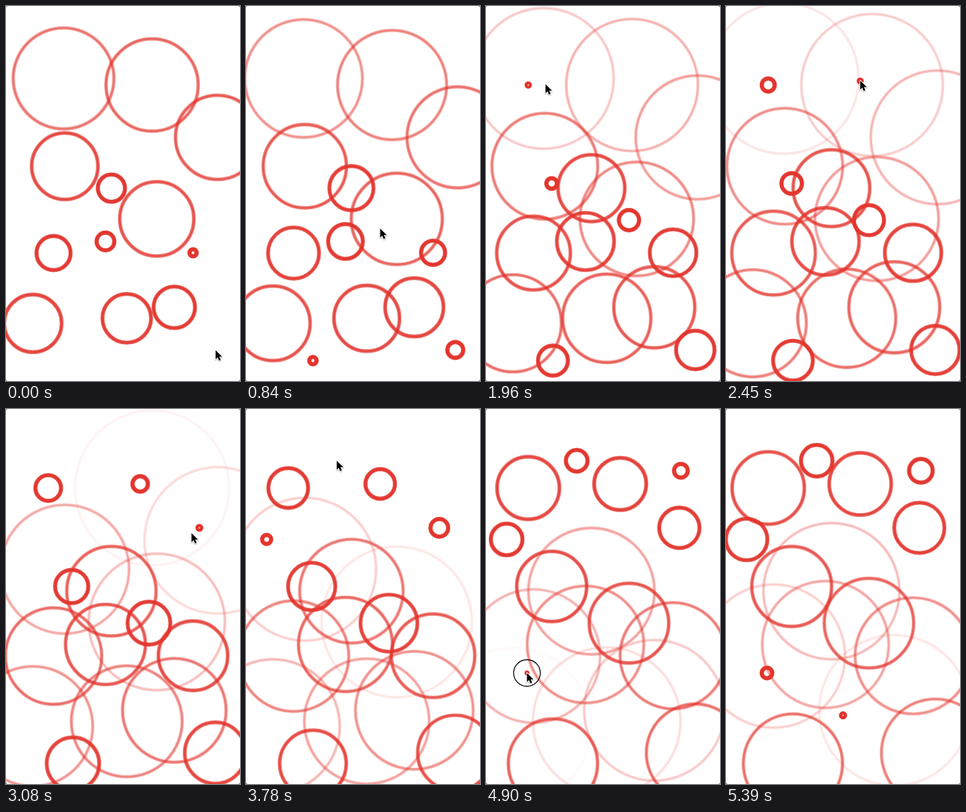
Animation of 374 by 598 pixels, one loop 5460 ms. Source, as an HTML page with a canvas:

```html
<!DOCTYPE html>
<html lang="en">
<head>
<meta charset="utf-8">
<title>Ripples</title>
<style>
  html, body { margin: 0; width: 100%; height: 100%; overflow: hidden; background: #fff; }
  canvas { display: block; width: 374px; height: 598px; }
</style>
</head>
<body>
<canvas id="stage" width="374" height="598"></canvas>
<script>
const W = 374, H = 598, LOOP = 5460, STEP = 70;
const SPEED = 0.016, START = 3, END = 128.5;
const ctx = document.getElementById('stage').getContext('2d');

// x, y, outer radius at time zero (negative: not tapped yet)
const rings = [
  [92, 115.5, 83.3], [233.5, 126, 76.5], [338, 209.5, 70], [241, 339.5, 62.2],
  [94, 255.5, 56], [43, 506, 49], [193, 498, 42], [269, 480.5, 36.3],
  [76, 394, 30.5], [168.5, 290.5, 25], [159, 375.5, 17.5], [299, 393.5, 9.1],
  [334.5, 548.5, 2.6], [107, 565.5, -4.2], [228.5, 341.5, -11.9], [105, 283, -19.5],
  [67.5, 126, -25.5], [214.5, 119.5, -33.6], [309, 189.5, -43], [33, 208, -49.9],
  [145, 82.5, -57.8], [311.5, 98.5, -64.1], [65.5, 421, -74.5], [187, 488.5, -79.7]
];

// The pointer rests at each tap, then heads for the next one
const path = [[0, 335, 549]];
for (const [x, y, r] of rings.filter(ring => ring[2] < START)) {
  const tap = (START - r) / SPEED;
  path.push([tap - 70, x, y], [tap + 80, x, y]);
}
path.push([840, 214.5, 355], [2450, 214.5, 119], [3080, 296.5, 198],
          [4410, 269.5, 195], [5360, 190, 625]);
path.sort((a, b) => a[0] - b[0]);

function pointerAt(t) {
  const i = path.findIndex(p => p[0] > t);
  if (i < 0) return path[path.length - 1].slice(1);
  if (i === 0) return path[0].slice(1);
  const a = path[i - 1], b = path[i];
  const k = (t - a[0]) / (b[0] - a[0]);
  const e = k * k * (3 - 2 * k);
  return [a[1] + (b[1] - a[1]) * e, a[2] + (b[2] - a[2]) * e];
}

function circle(x, y, r, width) {
  ctx.lineWidth = width;
  ctx.beginPath();
  ctx.arc(x, y, r, 0, Math.PI * 2);
  ctx.stroke();
}

function drawRing(x, y, outer) {
  const width = Math.min(outer * 0.85, 7 - outer / 60);
  const mid = outer - width / 2;
  ctx.globalAlpha = 1 - Math.pow(outer / END, 1.4);
  ctx.strokeStyle = '#e3342c';
  circle(x, y, mid, width);
  circle(x, y, mid, width * 0.45);
  ctx.globalAlpha = 1;
}

const arrow = new Path2D('M0 0V14.2L3.3 11.2L5.6 16.4L8.2 15.3L5.9 10.2H10.4Z');

function drawPointer(x, y) {
  ctx.save();
  ctx.translate(x, y);
  ctx.lineJoin = 'round';
  ctx.lineWidth = 2;
  ctx.strokeStyle = '#fff';
  ctx.shadowColor = 'rgba(0,0,0,.35)';
  ctx.shadowBlur = 2;
  ctx.shadowOffsetY = 1;
  ctx.stroke(arrow);
  ctx.shadowColor = 'transparent';
  ctx.fillStyle = '#000';
  ctx.fill(arrow);
  ctx.restore();
}

function drawCorners() {
  ctx.fillStyle = '#555';
  ctx.beginPath();
  ctx.rect(0, 0, W, H);
  ctx.roundRect(0, 0, W, H, 3);
  ctx.fill('evenodd');
}

function draw(t) {
  ctx.fillStyle = '#fff';
  ctx.fillRect(0, 0, W, H);
  for (const [x, y, r] of rings) {
    const outer = r + t * SPEED;
    if (outer >= START && outer < END) drawRing(x, y, outer);
  }
  for (const [x, y, r] of rings) {
    const outer = r + t * SPEED;
    if (r < START && outer >= START && outer < 4.7) {
      ctx.strokeStyle = '#000';
      circle(x, y, 21.3, 1.4);
    }
  }
  drawPointer(...pointerAt(t));
  drawCorners();
}

const origin = performance.now();
function tick() {
  const t = (performance.now() - origin) % LOOP;
  draw(Math.floor(t / STEP) * STEP);
  requestAnimationFrame(tick);
}
tick();
</script>
</body>
</html>
```
